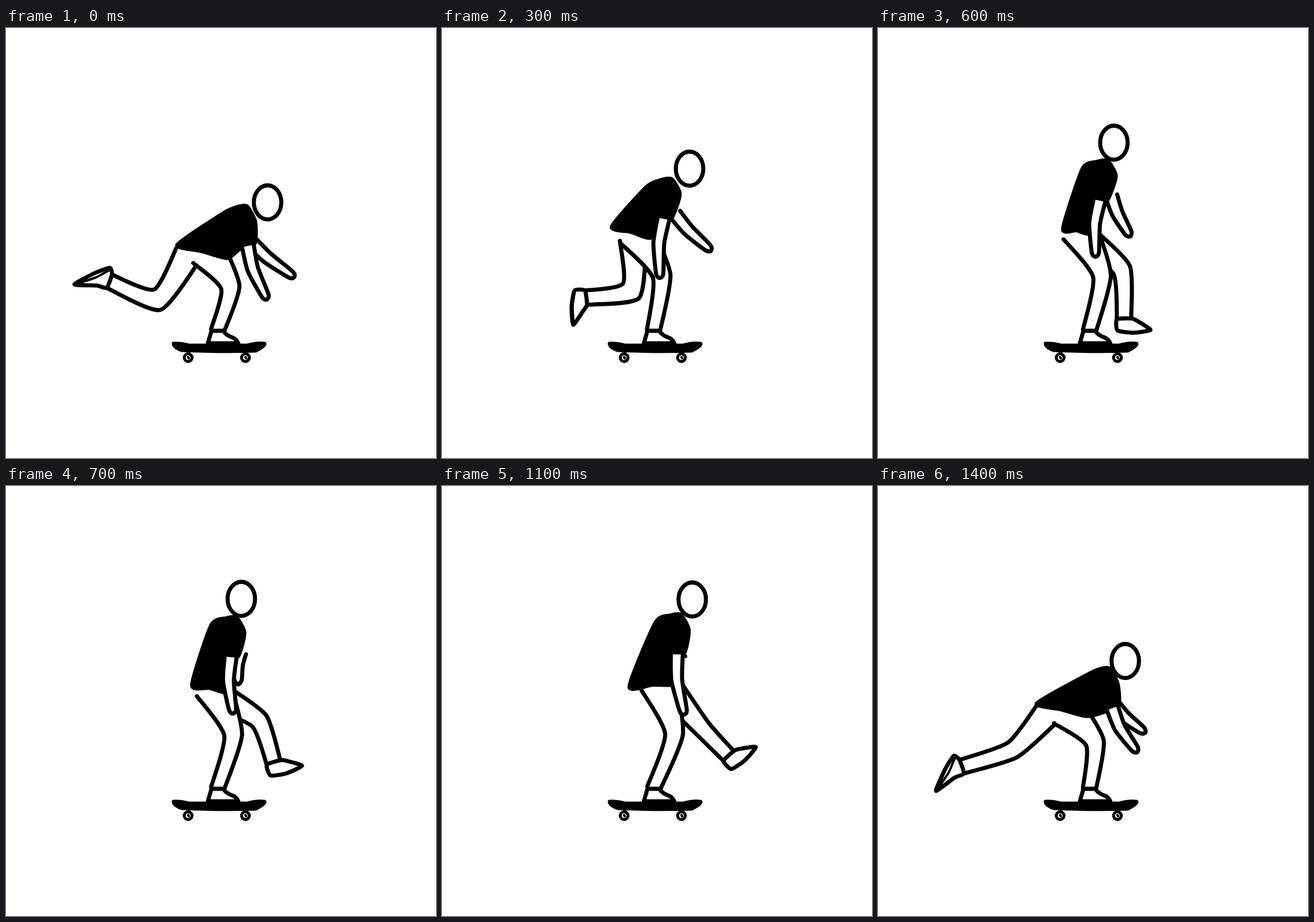
Animation, 720 px wide and 720 px high, one loop 1500 ms. Source, as an HTML page:

```html
<!DOCTYPE html>
<html lang="en">
<head>
<meta charset="utf-8">
<title>Skater</title>
<style>
html, body { margin: 0; width: 100%; height: 100%; overflow: hidden; background: #fff; }
svg { display: block; width: 100vw; height: 100vh; }
path { fill: none; stroke: #000; stroke-width: 6.8; stroke-linecap: round; stroke-linejoin: round; }
.skin { fill: #fff; }
.under { fill: #fff; stroke: none; }
.solid { fill: #000; stroke-width: 5; }
.wheel { fill: #fff; stroke-width: 5; }
.thin { stroke-width: 4; }
</style>
</head>
<body>
<svg id="stage" viewBox="0 0 720 720"></svg>
<script>
const LOOP = 1500, STEP = 100;
const BEATS = [0, 200, 400, 600, 900, 1100, 1400];
const SWING = [0, 200, 400, 500, 600, 900, 1100, 1200, 1300, 1400];
const ANKLE = [354, 507];

const mix = (a, b, k) => a.map((v, i) => v + (b[i] - v) * k);
const add = (a, b, k = 1) => a.map((v, i) => v + b[i] * k);
const clamp = v => Math.max(0, Math.min(1, v));
const unit = (a, b) => {
  const d = add(b, a, -1), len = Math.hypot(...d) || 1;
  return d.map(v => v / len);
};
const turn = ([x, y]) => [-y, x];

// A joint that travels through a few waypoints.
function joint(route, beats = BEATS) {
  const stops = route.split(' ').map(p => p.split(',').map(Number));
  return t => {
    const i = Math.max(1, beats.findIndex(b => b >= t));
    return mix(stops[i - 1], stops[i], (t - beats[i - 1]) / (beats[i] - beats[i - 1]));
  };
}

const joints = {
  head: joint('438,292 422,260 407,211 395,192 392,183 419,190 414,293'),
  neck: joint('404,298 388,277 382,228 385,222 388,215 400,215 388,305'),
  hemBack: joint('286,363 281,336 286,329 309,336 314,328 313,336 265,364'),
  hemFront: joint('371,386 356,365 343,339 355,343 399,347 393,331 349,386'),
  nearHand: joint('434,448 380,430 349,393 364,376 410,370 404,376 430,440'),
  farHand: joint('477,413 456,382 435,354 419,343 328,290 337,290 442,409'),
  kickKnee: joint('253,455 284,444 349,436 382,425 408,405 457,371 437,407 392,440 278,455 225,442', SWING),
  kickAnkle: joint('173,424 202,433 280,470 350,498 412,487 520,415 480,452 386,520 235,525 140,470', SWING)
};

// Cardinal spline through the points.
function spline(pts, closed = false, k = 0.11) {
  const n = pts.length;
  const pick = i => pts[closed ? (i + n) % n : Math.max(0, Math.min(n - 1, i))];
  let d = 'M' + pts[0];
  for (let i = 0; i < (closed ? n : n - 1); i++) {
    const [a, b, c, e] = [-1, 0, 1, 2].map(o => pick(i + o));
    d += `C${add(b, add(c, a, -1), k)} ${add(c, add(e, b, -1), -k)} ${c}`;
  }
  return closed ? d + 'Z' : d;
}

const oval = ([x, y], rx, ry) =>
  `M${x - rx},${y}a${rx},${ry} 0 1 0 ${2 * rx},0a${rx},${ry} 0 1 0 ${-2 * rx},0Z`;

// Point between a and b, pushed sideways.
const bend = (a, b, k, side) => add(mix(a, b, k), turn(unit(a, b)), side);

// Both outlines of a two-bone limb, mitred at the middle joint.
function limb([a, b, c], [wa, wb, wc]) {
  const n1 = turn(unit(a, b)), n2 = turn(unit(b, c));
  const m = unit([0, 0], add(n1, n2));
  const miter = wb / Math.max(0.6, m[0] * n1[0] + m[1] * n1[1]);
  const side = s => [add(a, n1, s * wa), add(b, m, s * miter), add(c, n2, s * wc)];
  return { left: side(1), right: side(-1) };
}

function arm(shoulder, hand, side) {
  const elbow = bend(shoulder, hand, 0.45, side);
  const { left, right } = limb([shoulder, elbow, hand], [10, 9, 6]);
  const tip = add(hand, unit(elbow, hand), 7);
  return spline([...left, tip, ...right.reverse()]);
}

const legFill = ({ left, right }) => spline([...left, ...right.slice().reverse()]) + 'Z';
const legLines = ({ left, right }) => spline(left) + spline(right);

// The toes point further the more the leg trails behind.
function foot(leg, knee, ankle) {
  const trail = clamp((260 - ankle[0]) / 90);
  const shin = unit(knee, ankle);
  const angle = Math.atan2(shin[1], shin[0]) + (40 * trail - 68) * Math.PI / 180;
  const u = [Math.cos(angle), Math.sin(angle)], w = turn(u);
  const at = (x, y) => add(add(ankle, u, x), w, y);
  const gap = 8 * trail;
  return {
    shape: spline([leg.left[2], at(-4, 22), at(22, 17), at(48 + 11 * trail, 3), at(22, -4), leg.right[2]], true, 0.09),
    sole: spline([at(-2, 22 - gap / 2), at(22, 17 - gap), at(46 + 11 * trail, 3)])
  };
}

function draw(t) {
  const j = {};
  for (const name in joints) j[name] = joints[name](t);
  const { head, neck, hemBack, hemFront, nearHand, farHand, kickKnee, kickAnkle } = j;

  const near = add(neck, [0.3 * (nearHand[0] - neck[0]) - 8, 67]);
  const far = add(neck, [6, 60]);
  const sleeve = turn(unit(near, nearHand));
  const torso = [
    neck, add(neck, [14, 26]), add(near, sleeve, -13), add(near, sleeve, 12),
    hemFront, mix(hemFront, hemBack, 0.5), hemBack, add(neck, [-43, 13]), add(neck, [-17, 1])
  ];

  const hip = mix(hemBack, hemFront, 0.62);
  const leg = limb([hip, bend(hip, ANKLE, 0.47, -30), ANKLE], [30, 14, 11]);

  const reach = clamp((kickKnee[0] - hemBack[0]) / (hemFront[0] - hemBack[0]));
  const kickHip = add(mix(hemBack, hemFront, 0.2 + 0.7 * reach), [0, 14]);
  const kick = limb([kickHip, kickKnee, kickAnkle], [22, 14, 12]);
  const shoe = foot(kick, kickKnee, kickAnkle);

  return {
    farArm: arm(far, farHand, 3),
    kickFill: legFill(kick),
    kickLines: legLines(kick),
    kickShoe: shoe.shape,
    sole: shoe.sole,
    legFill: legFill(leg),
    legLines: legLines(leg),
    torso: spline(torso, true),
    nearArm: arm(near, nearHand, 5),
    head: oval(head, 23, 28.5)
  };
}

const wheels = [[305, 552], [401, 552]];
const board = {
  shoe: 'M344,507L338,528H389Q386,520 376,517Q367,513 364,507Z',
  trucks: wheels.map(([x, y]) => `M${x - 2},${y - 6}L${x + 4},${y - 12}`).join(''),
  wheels: wheels.map(p => oval(p, 6.5, 6.5)).join(''),
  hubs: wheels.map(([x, y]) => `M${x},${y - 1}l1,2`).join(''),
  deck: 'M280,528Q291,527 306,531H404Q420,526 433,528Q437,531 418,541Q360,543 294,540Q280,535 280,528Z'
};

// Back to front.
const styles = {
  farArm: 'skin', kickFill: 'under', kickLines: '', kickShoe: 'skin', sole: 'thin',
  legFill: 'under', legLines: '', shoe: 'skin', torso: 'solid', nearArm: 'skin', head: 'skin',
  trucks: 'thin', wheels: 'wheel', hubs: 'thin', deck: 'solid'
};
const parts = {};
for (const name in styles) {
  const el = document.createElementNS('http://www.w3.org/2000/svg', 'path');
  el.setAttribute('class', styles[name]);
  document.getElementById('stage').append(el);
  parts[name] = el;
}
const show = shapes => {
  for (const name in shapes) parts[name].setAttribute('d', shapes[name]);
};

let shown = -1, start;
function tick(now) {
  start ??= now;
  const t = Math.floor(Math.max(0, now - start) % LOOP / STEP) * STEP;
  if (t !== shown) show(draw(shown = t));
  requestAnimationFrame(tick);
}
show(board);
tick(performance.now());
</script>
</body>
</html>
```
